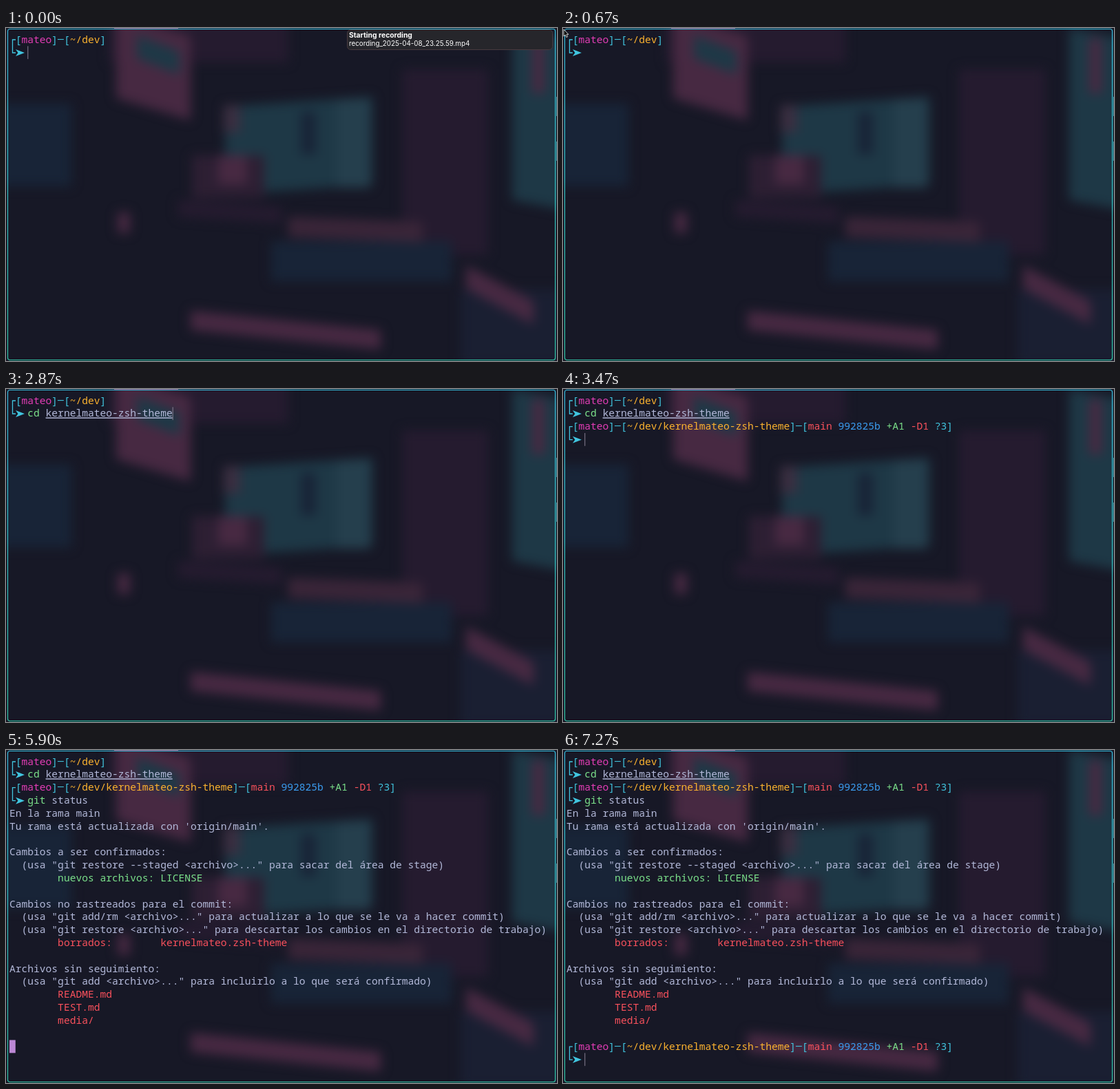
These frames come from a looping animation (800x484 px, 7.63 s). An HTML page:

```html
<!DOCTYPE html>
<html lang="es">
<head>
<meta charset="utf-8">
<style>
  html, body { margin: 0; width: 100%; height: 100%; overflow: hidden; background: #171826; }
  svg { display: block; }
  #term text { font: 500 14.61px "Noto Sans Mono", "DejaVu Sans Mono", monospace; white-space: pre; }
  #note text { font-family: Inter, Roboto, sans-serif; fill: #fff; }
</style>
</head>
<body>
<svg width="800" height="484" viewBox="0 0 800 484">
  <defs>
    <filter id="soft" filterUnits="userSpaceOnUse" x="-40" y="-40" width="880" height="564" color-interpolation-filters="sRGB">
      <feGaussianBlur stdDeviation="8"/>
    </filter>
    <linearGradient id="edge" x1="0" y1="0" x2="0" y2="1">
      <stop offset="0" stop-color="#36bfe0"/><stop offset="1" stop-color="#30c9a8"/>
    </linearGradient>
  </defs>
  <rect width="800" height="484" fill="#171826"/>
  <g id="room" filter="url(#soft)"></g>
  <path d="M157 .5H250" stroke="#a04a72"/>
  <path d="M799.5 100V208" stroke="#4fa5b5" stroke-dasharray="28 37"/>
  <rect x="2.5" y="1.5" width="795" height="481" rx="3" fill="none" stroke="url(#edge)" stroke-width="1.2"/>
  <g id="term"></g>
  <g id="note">
    <rect x="495.5" y="2.5" width="298" height="29" rx="5" fill="#26262b" stroke="#493a3f"/>
    <text x="498" y="14.4" font-size="10.35" font-weight="700">Starting recording</text>
    <text x="498" y="25.6" font-size="9.8">recording_2025-04-08_23.25.59.mp4</text>
  </g>
  <path id="pointer" d="M1 2V12L3.3 10L5 13.5L6.7 12.7L5.2 9.3H8Z" fill="#111" stroke="#ddd" stroke-width=".9"/>
</svg>
<script>
const $ = id => document.getElementById(id);
const LOOP = 7630, LEFT = 5, TOP = 7.5, CW = 8.766, LH = 18.82;
const CYAN = '#41c5df', PINK = '#e23db5', GOLD = '#fbb22f', RED = '#f9515c', BLUE = '#3b9df0',
      GREEN = '#7be08a', TEXT = '#b3b9d9', DIM = '#494b61';
const USER = 'mateo', REPO = 'kernelmateo-zsh-theme';

// Blurred room behind the terminal: slanted panels lit in three tones
const ROSE = '#472942', TEAL = '#1e3846', NAVY = '#182437', PLUM = '#251b2f';
const panel = (fill, x, y, w, h, slant = 0) =>
  `<path d="M${x} ${y}l${w} ${slant}v${h}l${-w} ${-slant}z" fill="${fill}"/>`;
$('room').innerHTML = [
  panel(NAVY, -10, 110, 105, 120),
  panel(PLUM, 150, -20, 260, 70),
  panel(ROSE, 160, -20, 108, 122, 32),
  panel(TEAL, 190, 10, 62, 34, 24),
  panel(PLUM, 575, 60, 125, 270),
  panel(TEAL, 318, 114, 214, 128, -14),
  panel('#253f4d', 480, 104, 48, 128),
  panel(NAVY, 428, 122, 22, 62),
  panel('#3a2f41', 316, 112, 24, 40),
  panel('#2d1f33', 270, 185, 105, 62),
  panel(ROSE, 308, 185, 42, 42),
  panel(PLUM, 250, 250, 150, 24, 10),
  panel(TEAL, 735, 0, 75, 250, 14),
  panel(ROSE, 764, 15, 18, 80),
  panel(NAVY, 385, 310, 262, 58),
  panel('#392538', 410, 274, 195, 30, 8),
  panel(ROSE, 162, 268, 18, 30),
  panel('#1a1f32', 660, 380, 150, 110),
  panel(ROSE, 668, 345, 98, 34, 52),
  panel(ROSE, 268, 411, 276, 28, 28),
].join('');

const escapeText = s => s.replace(/&/g, '&amp;').replace(/</g, '&lt;');
const line = (row, col, ...parts) =>
  `<text x="${LEFT + col * CW}" y="${TOP + row * LH + 14}">` + parts.map(([s, color, under]) =>
    `<tspan fill="${color}"${under ? ' text-decoration="underline"' : ''}>${escapeText(s)}</tspan>`).join('') + '</text>';

function prompt(row, path, git) {
  const parts = [['[', CYAN], [USER, PINK], [']─[', CYAN], [path, GOLD], [']', CYAN]];
  if (git) parts.push(['─[', CYAN], ['main ', RED], ['992825b ', BLUE], ['+A1 ', GREEN], ['-D1 ', RED], ['?3]', CYAN]);
  return line(row, 1, ...parts) + `<g transform="translate(0 ${row * LH})">
    <path d="M14 17H9.5V36H14" fill="none" stroke="${CYAN}" stroke-width="1.3"/>
    <path d="M14 31L27 36L14 41L17.5 36Z" fill="${CYAN}"/></g>`;
}

const lineColor = s => !s.startsWith('        ') ? TEXT : s.includes('nuevos') ? GREEN : RED;
const output = `En la rama main
Tu rama está actualizada con 'origin/main'.

Cambios a ser confirmados:
  (usa "git restore --staged <archivo>..." para sacar del área de stage)
        nuevos archivos: LICENSE

Cambios no rastreados para el commit:
  (usa "git add/rm <archivo>..." para actualizar a lo que se le va a hacer commit)
  (usa "git restore <archivo>..." para descartar los cambios en el directorio de trabajo)
        borrados:        kernelmateo.zsh-theme

Archivos sin seguimiento:
  (usa "git add <archivo>..." para incluirlo a lo que será confirmado)
        README.md
        TEST.md
        media/`.split('\n').map((s, i) => line(4 + i, 0, [s, lineColor(s)])).join('');

// Bursts of keys: [start, time per key, text]; no time per key means pasted or completed
const cdKeys = [[870, 160, 'cd'], [1330, 0, ' '], [2270, 160, 'ke'], [2870, 0, REPO.slice(2)]];
const gitKeys = [[4330, 100, 'gi'], [4630, 135, 't s'], [5100, 70, 'ta'], [5330, 0, 't'], [5500, 70, 'us']];
const typed = (keys, t) => keys.map(([at, gap, s]) =>
  t < at ? '' : gap ? s.slice(0, 1 + Math.floor((t - at) / gap)) : s).join('');

function command(row, text, name, hint, under) {
  const head = text.slice(0, name.length);
  return line(row, 3, [head, head === name ? GREEN : RED],
    [text.slice(name.length, name.length + 1), TEXT],
    [text.slice(name.length + 1), TEXT, under],
    [text && hint.slice(text.length), DIM]);
}

const ENTER_CD = 3270, PROMPT_CD = 3370, ENTER_GIT = 5830, OUTPUT = 5870, PROMPT_GIT = 5930;
const activity = [0, ...[...cdKeys, ...gitKeys].flatMap(([at, gap, s]) => [at, at + gap * (s.length - 1)]),
  ENTER_CD, PROMPT_CD, ENTER_GIT, PROMPT_GIT];

function cursor(t, row, col, block) {
  const idle = (t - Math.max(...activity.filter(at => at <= t))) % 1200;
  if (idle >= 500 && idle < 1000) return '';
  return `<rect x="${LEFT + col * CW}" y="${TOP + row * LH}" width="${block ? CW : 1}" height="${LH}"
    fill="${block ? '#bc88d5' : '#8a8295'}"/>`;
}

function screen(t) {
  const cd = typed(cdKeys, t), git = typed(gitKeys, t), repoPath = '~/dev/' + REPO;
  let s = prompt(0, '~/dev') + command(1, cd, 'cd', cd.length < 4 ? 'cd ~/dev' : 'cd ' + REPO, true);
  if (t < ENTER_CD) return s + cursor(t, 1, 3 + cd.length);
  if (t < PROMPT_CD) return s + cursor(t, 2, 0, true);
  s += prompt(2, repoPath, true) + command(3, git, 'git', 'git status');
  if (t < ENTER_GIT) return s + cursor(t, 3, 3 + git.length);
  if (t < OUTPUT) return s + cursor(t, 4, 0, true);
  s += output;
  if (t < PROMPT_GIT) return s + cursor(t, 22, 0, true);
  return s + prompt(22, repoPath, true) + cursor(t, 23, 3);
}

let shown;
function draw(t) {
  const next = screen(t);
  if (next !== shown) $('term').innerHTML = shown = next;
  $('note').style.opacity = Math.max(0, Math.min(1, (650 - t) / 250));
  $('pointer').style.display = t >= 600 && t < 2270 ? '' : 'none';
}
const start = performance.now();
function tick() {
  draw((performance.now() - start) % LOOP);
  requestAnimationFrame(tick);
}
tick();
</script>
</body>
</html>
```
